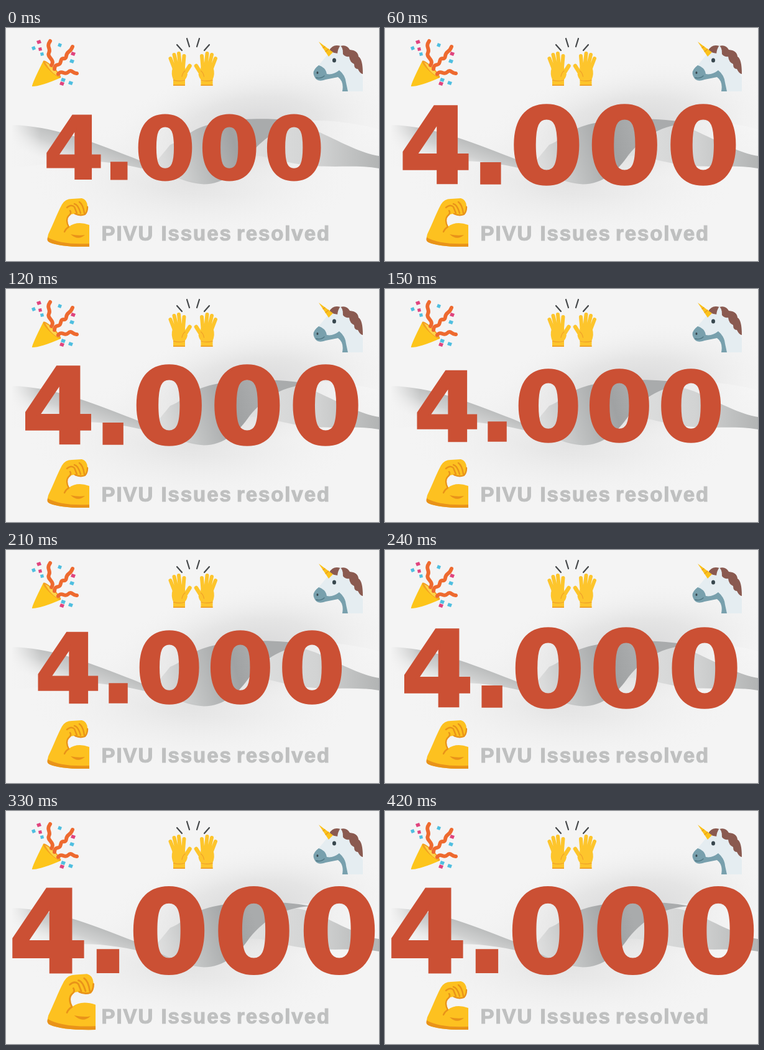
Write an HTML page that moves like this. It is 600 px wide and 375 px high and loops after 1530 ms.

```html
<!DOCTYPE html>
<html lang="en">
<head>
<meta charset="utf-8">
<title>4.000 issues resolved</title>
<style>
  html, body { margin: 0; width: 100%; height: 100%; overflow: hidden; background: #f4f4f4; }
  svg { display: block; width: 100%; height: 100%; }
  .count { font: bold 184px "DejaVu Sans", sans-serif; text-anchor: middle; fill: #cb5034; stroke: #cb5034; stroke-width: 4; }
  .caption { font: bold 33px "Liberation Sans", Arial, sans-serif; letter-spacing: 1.9px; fill: #bfc0c0; stroke: #bfc0c0; stroke-width: 1.2; }
  .line { fill: none; stroke-linecap: round; stroke-linejoin: round; }
</style>
</head>
<body>
<svg viewBox="0 0 600 375">
  <defs>
    <radialGradient id="shade" gradientUnits="userSpaceOnUse" cx="0" cy="0" r="1" gradientTransform="translate(395 160) rotate(-8) scale(240 105)">
      <stop offset="0" stop-color="#d6d6d7"/>
      <stop offset=".45" stop-color="#e0e0e0" stop-opacity=".75"/>
      <stop offset="1" stop-color="#f4f4f4" stop-opacity="0"/>
    </radialGradient>
    <radialGradient id="floor" gradientUnits="userSpaceOnUse" cx="0" cy="0" r="1" gradientTransform="translate(300 245) scale(270 105)">
      <stop offset="0" stop-color="#dfdfdf"/>
      <stop offset="1" stop-color="#f4f4f4" stop-opacity="0"/>
    </radialGradient>
    <linearGradient id="leftBand" gradientUnits="userSpaceOnUse" x1="112" y1="165" x2="92" y2="222">
      <stop offset="0" stop-color="#b3b5b5"/>
      <stop offset=".5" stop-color="#cfd0d0"/>
      <stop offset="1" stop-color="#ececec" stop-opacity=".3"/>
    </linearGradient>
    <linearGradient id="leftFade">
      <stop offset="0" stop-color="#f4f4f4"/>
      <stop offset="1" stop-color="#f4f4f4" stop-opacity="0"/>
    </linearGradient>
    <linearGradient id="fold" gradientUnits="userSpaceOnUse" x1="235" y1="225" x2="400" y2="175">
      <stop offset="0" stop-color="#d0d1d1" stop-opacity=".3"/>
      <stop offset=".4" stop-color="#c1c3c3"/>
      <stop offset=".8" stop-color="#a0a2a3"/>
      <stop offset="1" stop-color="#a9abac"/>
    </linearGradient>
    <linearGradient id="rightBand" gradientUnits="userSpaceOnUse" x1="400" y1="0" x2="600" y2="0">
      <stop offset="0" stop-color="#dedfdf"/>
      <stop offset=".5" stop-color="#d2d3d3"/>
      <stop offset="1" stop-color="#b2b4b4"/>
    </linearGradient>
    <linearGradient id="sheen" x2="0" y2="1">
      <stop offset="0" stop-color="#fafafa"/>
      <stop offset="1" stop-color="#f0f0f0"/>
    </linearGradient>

    <g id="hand">
      <path class="line" stroke="#fdc52c" stroke-width="6" d="M271 66L264.500 49M275 62L270.500 43M280 61L278 41M285 63L286.500 45"/>
      <path class="line" stroke="#fdc52c" stroke-width="6.500" d="M286 76L295.500 61"/>
      <path fill="#fdc52c" d="M268 64Q278 56 288 63L289 72L292 74Q291 80 288 83V93H269V83Q265 74 268 64Z"/>
      <path class="line" stroke="#f0a32a" stroke-width="1.300" d="M269.500 84Q279 86.500 287.500 84M283 78Q284 72 288 69"/>
      <path fill="#f0a32a" d="M269 91H288V93H269Z"/>
    </g>
  </defs>

  <rect width="600" height="375" fill="#f4f4f4"/>
  <rect width="600" height="375" fill="url(#floor)"/>
  <rect width="600" height="375" fill="url(#shade)"/>

  <!-- ribbon -->
  <path fill="url(#sheen)" opacity=".4" d="M440 152Q520 142 600 163V206Q540 190 440 152Z"/>
  <path fill="url(#rightBand)" d="M392 178C420 150 465 150 505 168C540 184 570 201 600 206V226C560 219 520 227 470 219C430 212 410 203 392 206Z"/>
  <path fill="url(#leftBand)" d="M10 156C75 158 130 180 205 209C250 228 275 246 318 251C270 242 225 222 150 215C100 211 60 222 10 224Z"/>
  <rect x="8" y="150" width="48" height="80" fill="url(#leftFade)"/>
  <path fill="url(#fold)" d="M236 222C262 235 285 249 318 251.500C352 251 374 230 392 204C418 173 445 156 490 153C430 142 345 144 306 163C290 171 280 182 264 188Z"/>

  <!-- party popper -->
  <g>
    <path fill="#fdc51b" d="M42 94Q41 91 60 53Q76 60 88 80Q56 94 42 94Z"/>
    <path fill="#f3a021" d="M60 53C64 49 91 75 88 80C84 82 57 59 60 53Z"/>
    <path fill="#fdd34a" d="M63 55Q77 62 86 78Q74 75 63 55Z"/>
    <g class="line" stroke="#ee6a2f" stroke-width="6" stroke-linecap="butt">
      <path d="M73 60C80 51 65 47 69 40S64 31 71 21"/>
      <path d="M78 66C79 54 86 64 88 54S96 54 97 45S103 41 107 30"/>
      <path d="M84 74C90 66 94 77 100 71S107 74 114 73"/>
    </g>
    <g fill="#4fbfe0">
      <path d="M41 31l5-2 2 5-5 2zM55 40l5-1 1 5-5 1zM85 24l5 2-2 5-5-2zM104 50l6 2-2 5-6-2zM90 80l6 2-2 5-6-2zM102 85l6 2-2 5-6-2z"/>
    </g>
    <g fill="#e0447e">
      <path d="M49 21l6-2 2 5-6 2zM52 32l5-1 1 5-5 1zM106 38l6 2-2 5-6-2zM88 86l6 2-2 5-6-2z"/>
    </g>
  </g>

  <!-- raised hands -->
  <use href="#hand"/>
  <use href="#hand" transform="matrix(-1 0 0 1 601.500 0)"/>
  <path class="line" stroke="#45484a" stroke-width="2.200" d="M275 27L283 36M291 17L295 30M311 17L307 30M327 27L319 36"/>

  <!-- unicorn -->
  <g>
    <path fill="#f0f5f8" d="M540 60H574V102H545Z"/>
    <path fill="#e5edf1" d="M522 37Q530 31 543 38Q558 42 564 60L574 79V102H541Q548 84 535 76L514 82Q500 87 496 77Q492 69 503 60Z"/>
    <path fill="#78a0ad" d="M503 60Q515 64 516 74Q526 76 536 68Q546 76 547 88L550 102H541Q544 86 534 79L514 83Q500 88 496 78Q491 69 503 60Z"/>
    <path fill="#8a5a50" d="M520 36Q526 25 538 29Q548 26 553 35Q566 36 567 46Q574 50 574 74Q570 74 566 66Q560 66 560 58Q553 55 552 46Q544 47 541 40Q530 43 520 36Z"/>
    <path fill="#e5edf1" d="M533 44Q533 34 538 28Q544 35 541 46Z"/>
    <path fill="#fcc21b" d="M503 22L526 39L519 46Z"/>
    <path class="line" stroke="#e59a20" stroke-width="1.200" d="M510 32l3-2M514 38l5-4"/>
    <ellipse cx="528" cy="52" rx="3" ry="3.600" fill="#38474e"/>
    <ellipse cx="501" cy="72" rx="1.500" ry="2" fill="#38474e"/>
    <path class="line" stroke="#4e7582" stroke-width="1.300" d="M499 80Q507 82 512 77"/>
  </g>

  <!-- flexed arm, scaled from its lower left corner -->
  <g id="arm">
    <path fill="#fdc120" d="M134 352Q88 353 70 345Q65 342 68 332C75 318 81 301 90 284Q95 275 106 275L122 274Q130 276 131 286Q131 296 127 300Q119 303 111 299Q101 299 99 306Q97 313 101 320Q114 310 134 317Z"/>
    <path fill="#e99319" d="M67 337Q65 343 70 345Q88 353 134 352V347Q88 349 67 337Z"/>
    <path fill="#e99319" d="M104 332Q116 343 127 333Q117 335 104 332Z"/>
    <path class="line" stroke="#e99319" stroke-width="2.400" d="M101 320C97 313 97 306 101 302Q106 298 103 294M98 289Q105 283 110 288L114 298M110 283Q116 284 120 298M118 280Q124 284 126 298M101 320Q96 323 94 328M131 288Q131 296 127 300Q119 303 111 299"/>
  </g>

  <text class="caption" y="342"><tspan x="153.500">PIVU</tspan> <tspan x="249.500">Issues</tspan> <tspan x="371">resolved</tspan></text>

  <g id="count">
    <text class="count" x="62 158 256 392.500 530" y="-2">4.000</text>
  </g>
</svg>
<script>
  const LOOP = 1530, STEP = 30, FULL = 589;
  const count = document.getElementById("count");
  const arm = document.getElementById("arm");

  // [step, left, baseline, width]
  const countKeys = [[0, 62, 244, 446], [3, 6, 256, FULL], [6, 69, 240, 446], [9, 6, 261, FULL]];
  // [step, scale]
  const armKeys = [[8, 1], [11, 1.15], [14, 1]];

  function pose(keys, step) {
    if (step <= keys[0][0]) return keys[0].slice(1);
    const i = keys.findIndex(key => key[0] > step);
    if (i < 0) return keys[keys.length - 1].slice(1);
    const a = keys[i - 1], b = keys[i];
    const p = (step - a[0]) / (b[0] - a[0]);
    return a.slice(1).map((v, n) => v + (b[n + 1] - v) * p);
  }

  function draw(time) {
    const step = Math.floor((time % LOOP) / STEP);
    const [left, base, width] = pose(countKeys, step);
    const [size] = pose(armKeys, step);
    count.setAttribute("transform", `translate(${left} ${base}) scale(${width / FULL})`);
    arm.setAttribute("transform", `translate(67 352) scale(${size}) translate(-67 -352)`);
  }

  const start = performance.now();
  function tick() {
    draw(performance.now() - start);
    requestAnimationFrame(tick);
  }
  tick();
</script>
</body>
</html>
```
